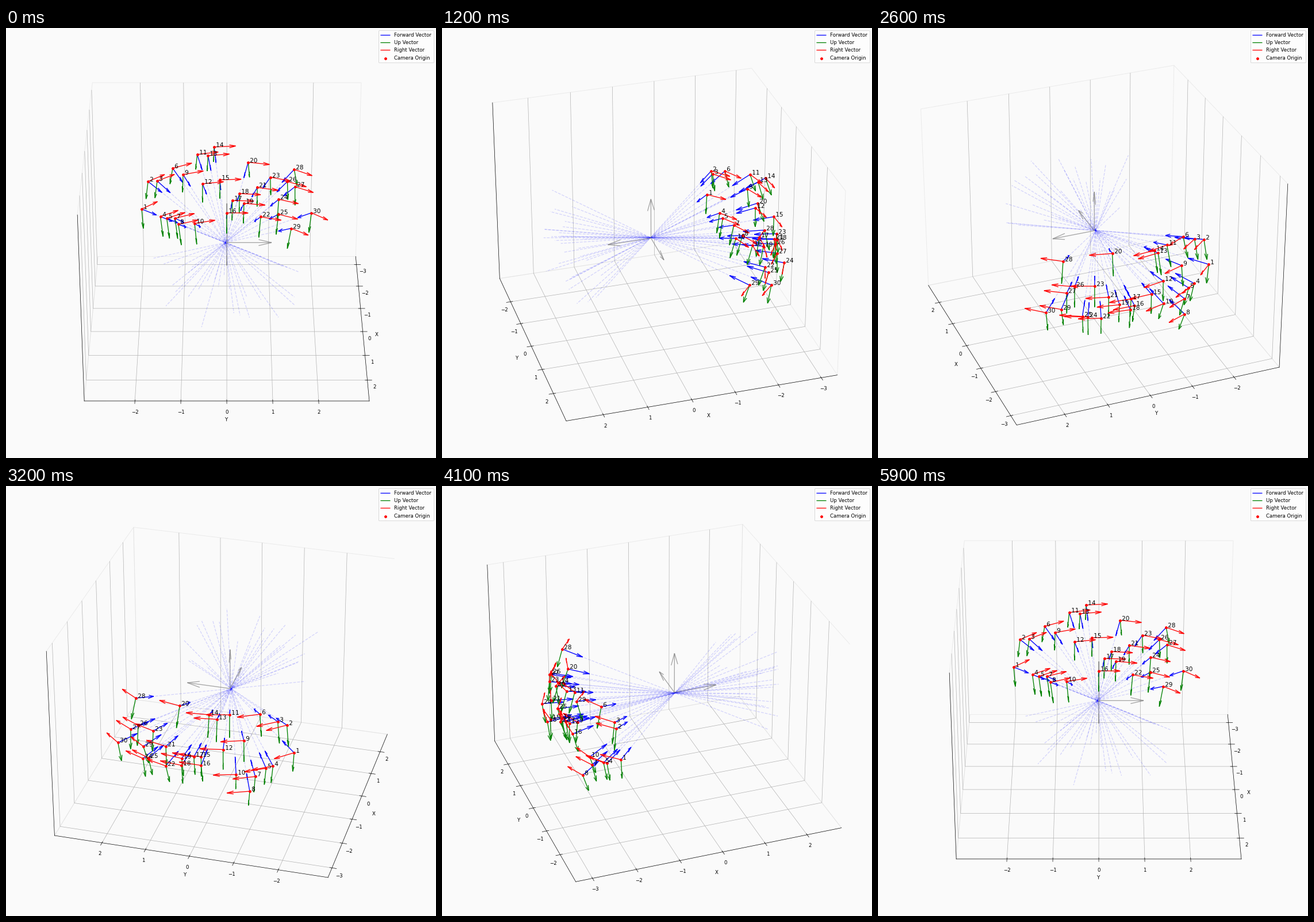
A matplotlib script for the animation above (6 s loop, 748 by 748 pixels).

```python
import matplotlib.pyplot as plt
import numpy as np
from matplotlib.animation import FuncAnimation
from mpl_toolkits.mplot3d.art3d import Line3DCollection

SIZE = 748
FRAMES = 60
ARROW = 0.5      # length of the camera axes
RAY = 5.0        # length of the dashed viewing rays
BACKGROUND = "#fafafa"

# Camera positions (x, y, z), numbered from 1
cams = np.array([
    (-1.943, -1.966, -0.233), (-1.992, -1.809, 0.466), (-1.957, -1.597, 0.500),
    (-2.122, -1.543, -0.532), (-2.154, -1.397, -0.596), (-2.136, -1.243, 0.733),
    (-2.362, -1.209, -0.714), (-2.554, -1.137, -0.986), (-2.610, -1.015, 0.311),
    (-2.263, -0.752, -0.797), (-2.555, -0.684, 0.869), (-2.657, -0.567, 0.042),
    (-2.664, -0.436, 0.781), (-2.787, -0.294, 0.942), (-2.967, -0.163, -0.020),
    (-2.411, -0.003, -0.596), (-2.525, 0.127, -0.329), (-2.900, 0.297, -0.352),
    (-2.534, 0.400, -0.411), (-2.332, 0.492, 0.785), (-2.679, 0.711, -0.069),
    (-2.442, 0.792, -0.721), (-2.617, 1.011, 0.239), (-2.743, 1.216, -0.420),
    (-2.381, 1.205, -0.617), (-2.447, 1.404, 0.217), (-2.434, 1.581, 0.087),
    (-2.132, 1.547, 0.705), (-1.839, 1.492, -0.686), (-2.180, 1.966, -0.466),
])


def unit(v):
    return v / np.linalg.norm(v, axis=1, keepdims=True)


# Every camera looks at the middle of the scene without roll
forward = unit(np.array([0, -0.03, 0]) - cams)
right = unit(np.cross([0, 0, 1], forward))
up = np.cross(right, forward)

fig = plt.figure(figsize=(12, 12), dpi=SIZE / 12, facecolor=BACKGROUND)
ax = fig.add_axes([0, 0, 1, 1], projection="3d", computed_zorder=False)
ax.set_facecolor(BACKGROUND)

rays = np.stack([cams, cams + RAY * forward], axis=1)
ax.add_collection3d(Line3DCollection(
    rays, colors="blue", alpha=0.15, linestyles="--", linewidths=1.5, zorder=1))

ax.quiver(*np.zeros((3, 3)), *np.eye(3), color="gray", alpha=0.7, zorder=2)

axes_styles = [(forward, "blue", "Forward Vector"),
               (up, "green", "Up Vector"),
               (right, "red", "Right Vector")]
for order, (vectors, color, label) in enumerate(axes_styles, start=3):
    ax.quiver(*cams.T, *vectors.T, length=ARROW, color=color,
              label=label, zorder=order)

ax.scatter(*cams.T, color="red", s=20, depthshade=False,
           label="Camera Origin", zorder=6)
for number, cam in enumerate(cams, start=1):
    ax.text(*cam, f" {number}", fontsize=12, zorder=7)

# Equal units on all three axes of the 4:4:3 box
half = 3.1025
ax.set_xlim(-0.276 - half, -0.276 + half)
ax.set_ylim(-half, half)
ax.set_zlim(-0.02 - 0.75 * half, -0.02 + 0.75 * half)
ax.set_xticks(range(-3, 3))
ax.set_yticks(range(-2, 3))
ax.set_zticks([])
ax.set_xlabel("X")
ax.set_ylabel("Y")
for axis in (ax.xaxis, ax.yaxis, ax.zaxis):
    axis.pane.fill = False
    axis.pane.set_edgecolor("0.85")
ax.legend(loc="upper right")


def update(i):
    # The tiny offset keeps the choice of back walls stable when seen head-on
    ax.view_init(elev=30, azim=360 * i / (FRAMES - 1) + 0.01)


anim = FuncAnimation(fig, update, frames=FRAMES, interval=100, repeat=True)
plt.show()
```
